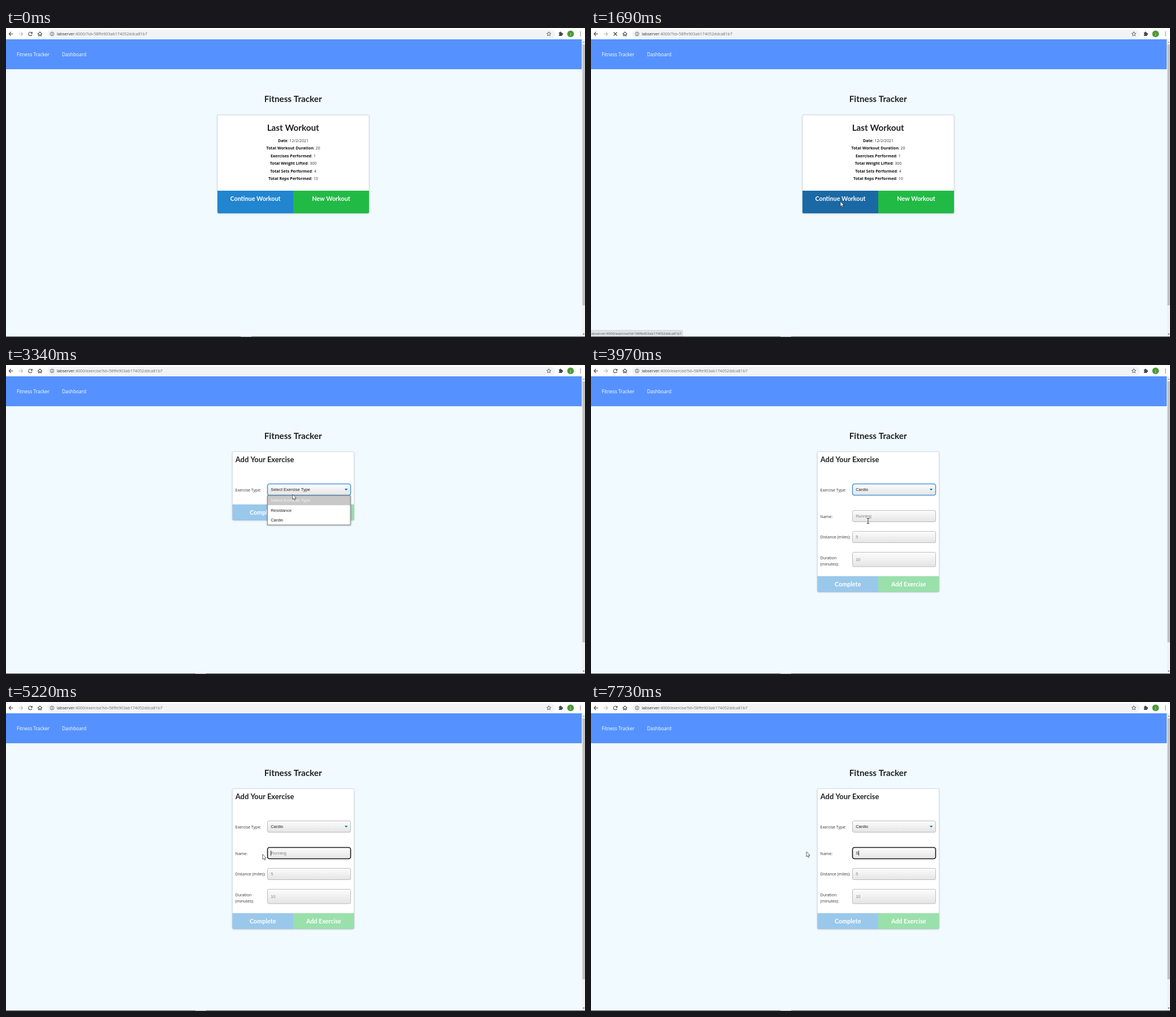
Animation, 1024 px wide and 547 px high, one loop 8000 ms. Source, as an HTML page with a canvas:

```html
<!DOCTYPE html>
<html lang="en">
<head>
<meta charset="utf-8">
<title>Fitness Tracker</title>
<style>
html, body { margin: 0; width: 100%; height: 100%; overflow: hidden; background: #f1fafe; }
canvas { display: block; width: 1024px; height: 547px; }
</style>
</head>
<body>
<canvas id="stage"></canvas>
<script>
const LOOP = 8000, STEP = 80, W = 1024, H = 547;
const UI = '"Open Sans", "Noto Sans", sans-serif';
const HEAD = 'Lato, sans-serif';
const FORM = '"Liberation Sans", Arial, sans-serif';
const TITLE = 'bold 15.25px ' + HEAD;
const HOST = 'labserver', PORT = ':4000', ID = '?id=58ffe903ab174052ddca81b7';

const canvas = document.getElementById('stage');
const dpr = window.devicePixelRatio || 1;
canvas.width = W * dpr;
canvas.height = H * dpr;
const c = canvas.getContext('2d');

// Pointer moves: start time, step count, evenly timed points
const MOVES = [
  [360, 11, [[837, 525], [767, 498], [693, 467], [635, 442], [575, 407], [515, 370], [467, 338], [458, 307]]],
  [1230, 2, [[458, 307], [441, 307]]],
  [1920, 8, [[441, 307], [450, 291], [463, 274], [488, 247], [506, 224]]],
  [3340, 4, [[506, 224], [507, 229], [503, 246], [496, 262], [490, 276]]],
  [4210, 6, [[490, 276], [492, 267], [494, 259], [494, 262], [494, 266]]],
  [4760, 2, [[494, 266], [517, 274]]],
  [5140, 7, [[517, 274], [462, 270], [405, 267], [376, 265], [381, 265]]]
];

const STATS = [
  ['Date', '12/2/2021'], ['Total Workout Duration', '20'], ['Exercises Performed', '1'],
  ['Total Weight Lifted', '300'], ['Total Sets Performed', '4'], ['Total Reps Performed', '10']
];
const OPTIONS = ['Select Exercise Type', 'Resistance', 'Cardio'];

function rect(x, y, w, h, fill) {
  c.fillStyle = fill;
  c.fillRect(x, y, w, h);
}

function round(x, y, w, h, r, fill, stroke, lw = 1) {
  c.beginPath();
  c.roundRect(x, y, w, h, r);
  if (fill) { c.fillStyle = fill; c.fill(); }
  if (stroke) { c.strokeStyle = stroke; c.lineWidth = lw; c.stroke(); }
}

function text(str, x, y, font, fill, align = 'left') {
  c.font = font;
  c.fillStyle = fill;
  c.textAlign = align;
  c.fillText(str, x, y);
  return c.measureText(str).width;
}

function line(pts, stroke, lw = 1) {
  c.beginPath();
  pts.forEach(([x, y]) => c.lineTo(x, y));
  c.strokeStyle = stroke;
  c.lineWidth = lw;
  c.stroke();
}

function poly(pts, fill) {
  c.beginPath();
  pts.forEach(([x, y]) => c.lineTo(x, y));
  c.closePath();
  c.fillStyle = fill;
  c.fill();
}

function disc(x, y, r, fill) {
  c.beginPath();
  c.arc(x, y, r, 0, 7);
  c.fillStyle = fill;
  c.fill();
}

function arrowIcon(x, dir, color) {
  line([[x - 3.5, 10.5], [x + 3.5, 10.5]], color, 1.1);
  line([[x + dir * 0.2, 7], [x + dir * 3.6, 10.5], [x + dir * 0.2, 14]], color, 1.1);
}

function toolbar(loading, path) {
  const ink = '#45484c';
  rect(0, 0, W, 20, '#fff');
  round(73, 3, 898, 15, 7.5, '#f1f3f4');
  arrowIcon(9, -1, ink);
  arrowIcon(26, 1, '#b9bbbe');
  if (loading) {
    line([[40, 7.5], [46, 13.5]], ink, 1.2);
    line([[46, 7.5], [40, 13.5]], ink, 1.2);
  } else {
    c.beginPath();
    c.arc(43, 10.5, 3.2, 0.3, 5.5);
    c.strokeStyle = ink;
    c.lineWidth = 1.1;
    c.stroke();
    poly([[46.8, 6.6], [46.8, 10], [43.4, 10]], ink);
  }
  line([[56, 10.8], [60, 7], [64, 10.8]], ink, 1.1);
  line([[57.4, 10], [57.4, 14], [59.2, 14], [59.2, 11.5], [60.8, 11.5], [60.8, 14], [62.6, 14], [62.6, 10]], ink, 1);

  c.beginPath();
  c.arc(81.5, 10.5, 3.3, 0, 7);
  c.lineWidth = 0.8;
  c.stroke();
  rect(81, 10, 1, 2.4, ink);
  rect(81, 8.4, 1, 1, ink);

  const font = '7.15px ' + UI;
  const w = text(HOST, 90, 13, font, '#2b2d30');
  text(PORT + path + ID, 90 + w, 13, font, '#6b6f74');

  c.beginPath();
  for (let i = 0; i < 10; i++) {
    const a = -Math.PI / 2 + i * Math.PI / 5, r = i % 2 ? 1.8 : 4;
    c.lineTo(960 + r * Math.cos(a), 10.6 + r * Math.sin(a));
  }
  c.closePath();
  c.lineWidth = 0.8;
  c.stroke();
  round(977.8, 8, 5.8, 6, 0.6, ink);
  disc(980.6, 7.8, 1.3, ink);
  disc(984, 10.8, 1.3, ink);
  disc(977.9, 11, 0.9, '#fff');
  disc(998.5, 10.3, 5.9, '#4a9a35');
  text('J', 998.5, 12.6, '6px ' + UI, '#fff', 'center');
  [7.2, 10.4, 13.6].forEach(y => disc(1016, y, 0.8, ink));
}

function pageFrame() {
  rect(0, 0, W, H, '#f1fafe');
  rect(0, 20, 1018.5, 53, '#5692ff');
  const font = '8.4px ' + UI;
  text('Fitness Tracker', 19, 50.2, font, '#fff');
  text('Dashboard', 99, 50.2, font, '#fff');
  rect(1018.5, 20, 5.5, 526, '#f1f1f1');
  rect(1019.5, 29, 4.5, 462, '#c1c1c1');
  poly([[1020, 26], [1023.4, 26], [1021.7, 24]], '#8a8a8a');
  poly([[1020, 541], [1023.4, 541], [1021.7, 543]], '#505050');
  text('Fitness Tracker', 507.7, 131.3, TITLE, '#1f2123', 'center');
}

function card(x, y, w, h) {
  c.save();
  c.shadowColor = 'rgba(34,36,80,.28)';
  c.shadowBlur = 3 * dpr;
  c.shadowOffsetY = 0.6 * dpr;
  round(x, y, w, h, 2, '#fff');
  c.restore();
  round(x, y, w, h, 2, null, '#d3d7e2', 0.8);
}

function buttons(x, y, w, h, left, right, blue, base) {
  const half = w / 2, font = 'bold 10.75px ' + HEAD;
  round(x, y, half, h, [0, 0, 0, 2], blue);
  round(x + half, y, half, h, [0, 0, 2, 0], '#21ba45');
  c.globalAlpha = 1;
  text(left, x + half / 2, base, font, '#fff', 'center');
  text(right, x + half * 1.5, base, font, '#fff', 'center');
}

function summary(t) {
  card(374, 154, 268, 174);
  text('Last Workout', 507.7, 182.4, TITLE, '#1f2123', 'center');
  const bold = 'bold 7.1px ' + UI, plain = '7.1px ' + UI;
  STATS.forEach(([name, value], i) => {
    const y = 201.8 + i * 13.47, rest = ': ' + value;
    c.font = bold;
    const a = c.measureText(name).width;
    c.font = plain;
    const x = 508 - (a + c.measureText(rest).width) / 2;
    text(name, x, y, bold, '#111');
    text(rest, x + a, y, plain, '#333');
  });
  const blue = t >= 1610 ? '#1a69a4' : t >= 1080 ? '#1678c2' : '#2185d0';
  buttons(374, 288, 268, 40, 'Continue Workout', 'New Workout', blue, 306);
}

function field(y, h, value, color, ring) {
  const g = c.createLinearGradient(0, y, 0, y + h);
  g.addColorStop(0, '#fdfdfd');
  g.addColorStop(1, '#e4e4e4');
  round(462.5, y + 0.5, 147, h - 1, ring ? 3.5 : 2.5, g, ring || '#adadad', ring ? 1.6 : 0.8);
  text(value, 468.2, y + h / 2 + 2.6, '7.47px ' + FORM, color);
}

function label(str, y) {
  text(str, 405.6, y, '7px ' + UI, '#333');
}

function menu(y) {
  const row = Math.max(0, Math.min(2, Math.floor((y - 231) / 17.2)));
  c.save();
  c.shadowColor = 'rgba(0,0,0,.35)';
  c.shadowBlur = 3 * dpr;
  c.shadowOffsetY = dpr;
  rect(462, 231, 147.5, 52, '#fff');
  c.restore();
  rect(462, 231 + row * 17.2, 147.5, 17.2, '#c8c8c8');
  OPTIONS.forEach((o, i) => {
    const color = i ? '#222' : row ? '#aaa' : '#f2f2f2';
    text(o, 468.2, 242.3 + i * 17.2, '7.47px ' + FORM, color);
  });
  c.strokeStyle = '#777';
  c.lineWidth = 0.9;
  c.strokeRect(462.5, 231, 146.5, 52);
}

function exercise(t, pointer) {
  const full = t >= 3970, named = t >= 5140, typed = t >= 7730;
  const foot = full ? 373.7 : 246.7;
  card(400.5, 153.5, 215, foot + 28 - 153.5);
  text('Add Your Exercise', 405.8, 171.8, 'bold 12.9px ' + HEAD, '#1f2123');
  label('Exercise Type:', 223.6);
  const ringed = t >= 2640 && !named;
  field(210, 21, OPTIONS[full ? 2 : 0], '#222', ringed && '#4a97de');
  poly([[598.8, 219], [604.4, 219], [601.6, 222.2]], '#0b7cb5');

  if (full) {
    label('Name:', 270.8);
    label('Distance (miles):', 307.4);
    label('Duration', 344);
    label('(minutes):', 354.6);
    field(257, 21, typed ? 'S' : 'Running', typed ? '#222' : '#858585', named && '#17191c');
    field(294, 21, '5', '#858585');
    field(331, 26.5, '10', '#858585');
    const caret = named && t < 5860 || t >= 6320 && t < 6870 || t >= 7420;
    if (caret) rect(typed ? 473.2 : 468, 263, 0.8, 9, '#111');
  }

  c.globalAlpha = 0.45;
  buttons(400.5, foot, 215, 28, 'Complete', 'Add Exercise', '#2185d0', foot + 18.1);
  if (t >= 2640 && !full) menu(pointer[1]);
}

function pointerAt(t) {
  const move = MOVES.filter(m => t >= m[0]).pop();
  if (!move) return null;
  const [start, steps, pts] = move;
  const i = Math.min(steps, Math.floor((t - start) / STEP) + 1);
  const u = i / steps * (pts.length - 1);
  const k = Math.min(pts.length - 2, Math.floor(u)), f = u - k;
  return [0, 1].map(d => pts[k][d] + (pts[k + 1][d] - pts[k][d]) * f);
}

function drawPointer(x, y, beam) {
  c.save();
  c.translate(x, y);
  if (beam) {
    line([[0, -4.5], [0, 4.5]], '#222', 0.9);
    line([[-2.3, -4.5], [2.3, -4.5]], '#222', 0.8);
    line([[-2.3, 4.5], [2.3, 4.5]], '#222', 0.8);
  } else {
    poly([[0, 0], [0, 9], [2, 7.2], [3.4, 10.2], [4.9, 9.5], [3.6, 6.6], [6.3, 6.4]], '#fff');
    c.strokeStyle = '#222';
    c.lineWidth = 0.7;
    c.stroke();
  }
  c.restore();
}

function draw(t) {
  c.setTransform(dpr, 0, 0, dpr, 0, 0);
  const second = t >= 1770, pointer = pointerAt(t);
  pageFrame();
  toolbar(t >= 1610 && !second, second ? '/exercise' : '/');
  if (second) exercise(t, pointer);
  else summary(t);
  if (t >= 1230 && t < 1920) {
    round(-2, 535, 164, 12, [0, 2, 0, 0], '#dee1e6', '#c6c9ce', 0.6);
    text(HOST + PORT + '/exercise' + ID, -1, 543.2, '6.15px ' + UI, '#55585c');
  }
  rect(0, 546, W, 1, '#4a4d50');
  rect(t < 1610 ? 415 : 335, 546, 19, 1, '#a5a8ab');
  if (pointer) {
    const [x, y] = pointer;
    drawPointer(x, y, t >= 3970 && x > 462 && y > 257 && y < 278);
  }
}

const begin = performance.now();
function tick() {
  draw((performance.now() - begin) % LOOP);
  requestAnimationFrame(tick);
}
tick();
</script>
</body>
</html>
```
